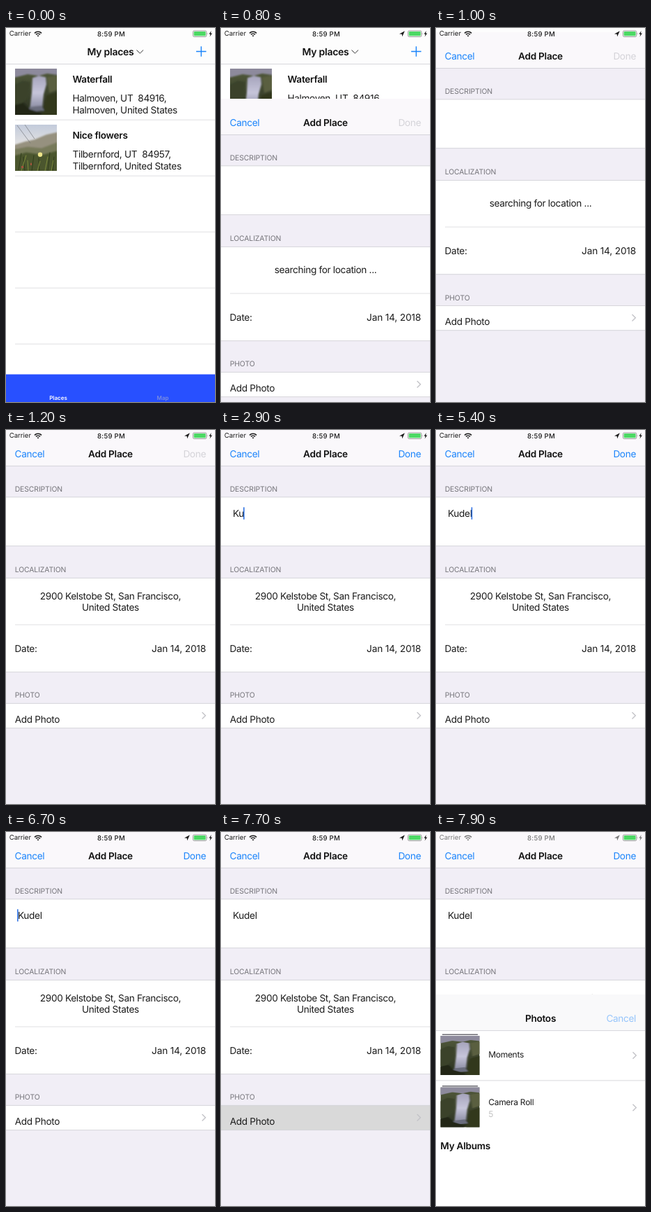
Write an HTML page that moves like this. It is 300 px wide and 534 px high and loops after 8 s.

```html
<!DOCTYPE html>
<html lang="en">
<head>
<meta charset="utf-8">
<title>My places</title>
<style>
  html, body { margin: 0; width: 100%; height: 100%; overflow: hidden; background: #fff; }
  svg { display: block; }
  text { font: 13.6px Inter, sans-serif; letter-spacing: -.33px; fill: #1c1c1c; text-rendering: geometricPrecision; }
  .mid { text-anchor: middle; }
  .end { text-anchor: end; }
  .bold { font-weight: 600; letter-spacing: -.26px; fill: #111; }
  .link { fill: #1a84fb; }
  .off { fill: #d4d3d8; }
  .head { font-size: 10.4px; letter-spacing: -.1px; fill: #75747a; }
  .row { font-size: 12px; letter-spacing: -.28px; }
  .tab { font-size: 8px; font-weight: 600; letter-spacing: 0; }
  .tiny { font-size: 9.6px; letter-spacing: 0; fill: currentColor; }
  .line { fill: none; stroke: #cfced4; stroke-width: .8; }
  .thin { stroke: #d9d9dc; }
  .chev { fill: none; stroke: #c3c3c8; stroke-width: 1.4; }
</style>
</head>
<body>
<svg width="300" height="534" viewBox="0 0 300 534">
  <defs>
    <linearGradient id="water" x1="0" y1="0" x2="0" y2="1">
      <stop offset="0" stop-color="#a5a3bb"/>
      <stop offset=".5" stop-color="#c6c5da"/>
      <stop offset="1" stop-color="#85879c"/>
    </linearGradient>
    <linearGradient id="cliff" x1="0" y1="0" x2="0" y2="1">
      <stop offset="0" stop-color="#525a3c"/>
      <stop offset="1" stop-color="#2b3120"/>
    </linearGradient>
    <linearGradient id="sky" x1="0" y1="0" x2="0" y2="1">
      <stop offset="0" stop-color="#c3cbdb"/>
      <stop offset=".5" stop-color="#e8e6e4"/>
    </linearGradient>
    <filter id="soft"><feGaussianBlur stdDeviation=".9"/></filter>
    <symbol id="falls" viewBox="0 0 60 65" preserveAspectRatio="none">
      <path fill="url(#cliff)" d="M0 0h60v65H0z"/>
      <g filter="url(#soft)">
        <path fill="#8d8a9c" d="M-3-3h66V9L46 7 34 10 18 8-3 13z"/>
        <path fill="#3a422b" d="M-3 24l14-7 11 2-3 22-10 8-12 2z"/>
        <path fill="url(#water)" d="M25 13l9-3 10 2 1 10-4 14-2 20-18 2 3-24z"/>
        <path fill="#5a5f3f" d="M46 12l17-3v20l-14 5z"/>
        <path fill="#33391f" d="M45 38l18-6v36H38z"/>
        <path fill="#6b6d7d" d="M21 54l17-2 4 7-24 2z"/>
        <path fill="#222819" d="M-3 52l15-4 9 9 16 5v6H-3z"/>
      </g>
    </symbol>
    <symbol id="meadow" viewBox="0 0 60 65" preserveAspectRatio="none">
      <path fill="url(#sky)" d="M0 0h60v65H0z"/>
      <g filter="url(#soft)">
        <path fill="#96917f" d="M-3 29l17-5 14-3 17-7 18-4v58H-3z"/>
        <path fill="#777a5a" d="M-3 35l21-4 20 2 25-9v44H-3z"/>
        <path fill="#4b562d" d="M-3 44l19-5 24 3 23-6v32H-3z"/>
      </g>
      <path fill="none" stroke="#303c1c" d="M5 64l4-24m5 25l-2-20m12 20l3-22m8 22l-1-18m13 18l3-26m4 26l2-20"/>
      <path fill="none" stroke="#7d8b3d" d="M9 65l7-22m3 22l-1-15m14 15l4-14m7 14l4-20m5 20l3-15"/>
      <path fill="none" stroke="#6a6c70" stroke-width=".6" d="M3 1l19 25M14 0l14 20"/>
      <path fill="#a4523c" d="M9 58h3v3H9zM22 54h2v3h-2z"/>
      <circle fill="#eee58a" cx="36" cy="42" r="3.2"/>
    </symbol>
  </defs>

  <g id="list">
    <path fill="#fdfdfd" d="M0 0h300v51H0z"/>
    <path class="line" d="M0 51.5h300"/>
    <path class="line thin" d="M13 131.2h287M13 211.2h287M13 291.2h287M13 371.2h287M13 451.2h287"/>
    <text class="mid bold" x="150" y="38.5" style="font-size:14px">My places</text>
    <path d="M187.5 31.5l4.8 4.6 4.8-4.6" fill="none" stroke="#333"/>
    <path id="plus" d="M273 33.5h14.4M280.2 26.3v14.4" fill="none" stroke="#1a84fb" stroke-width="1.4"/>
    <use href="#falls" x="13" y="58" width="60" height="66"/>
    <text class="bold" x="95.5" y="77.7">Waterfall</text>
    <text x="95.5" y="105.2">Halmoven, UT&#160; 84916,</text>
    <text x="95.5" y="121.6">Halmoven, United States</text>
    <use href="#meadow" x="13" y="138" width="60" height="66"/>
    <text class="bold" x="95.5" y="157.7">Nice flowers</text>
    <text x="95.5" y="185.2">Tilbernford, UT&#160; 84957,</text>
    <text x="95.5" y="201.6">Tilbernford, United States</text>
    <path fill="#2850ff" d="M0 494.6h300V534H0z"/>
    <text class="tab mid" x="75" y="531" style="fill:#fff">Places</text>
    <text class="tab mid" x="225" y="531" style="fill:#7b8de0">Map</text>
  </g>

  <g id="form">
    <path fill="#f1eef6" d="M0 0h300v534H0z"/>
    <path fill="#faf8fb" d="M0 0h300v51H0z"/>
    <path fill="#fff" d="M0 96h300v69.5H0zM0 211.5h300v134H0zM0 390.5h300v35H0z"/>
    <path id="press" fill="#d9d9d9" d="M0 390.5h300v35H0z"/>
    <path class="line" d="M0 51.4h300M0 95.8h300M0 165.6h300M0 211.4h300M0 345.6h300M0 390.4h300M0 425.6h300"/>
    <path class="line thin" d="M13 278h287"/>
    <text class="link" x="12.6" y="38.5">Cancel</text>
    <text class="mid bold" x="150" y="38.5">Add Place</text>
    <text class="end off" id="done" x="287" y="38.5">Done</text>
    <text class="head" x="12.7" y="87.8">DESCRIPTION</text>
    <text id="word" x="17" y="124">Kudel</text>
    <rect id="caret" y="110.3" width="1.6" height="17.4" fill="#2f72e4"/>
    <text class="head" x="12.7" y="202.9">LOCALIZATION</text>
    <text class="mid" id="search" x="150" y="248.6">searching for location ...</text>
    <g id="address">
      <text class="mid" x="150" y="241.6">2900 Kelstobe St, San Francisco,</text>
      <text class="mid" x="150" y="257.6">United States</text>
    </g>
    <text x="12.6" y="316.8">Date:</text>
    <text class="end" x="287" y="316.8" style="letter-spacing:-.14px">Jan 14, 2018</text>
    <text class="head" x="12.7" y="382.4">PHOTO</text>
    <text x="12.8" y="418.2">Add Photo</text>
    <path class="chev" d="M281.5 403l4.8 4.7-4.8 4.7"/>
  </g>

  <g id="albums">
    <path fill="#fff" d="M0 0h300v534H0z"/>
    <path fill="#f9f9fa" d="M0 0h300v51H0z"/>
    <path class="line" d="M0 51.5h300M0 122.8h300"/>
    <text class="mid bold" x="150" y="38.5">Photos</text>
    <text class="end" x="287" y="38.5" style="fill:#96c5fb">Cancel</text>
    <path fill="#6b6a72" d="M9 56.5h51v1.4H9zM9 130h51v1.4H9z"/>
    <use href="#falls" x="6.5" y="59" width="56" height="56"/>
    <use href="#falls" x="6.5" y="132.5" width="56" height="57"/>
    <text class="row" x="75.2" y="90">Moments</text>
    <text class="row" x="75.2" y="158">Camera Roll</text>
    <text class="row" x="75.2" y="175.2" style="fill:#c2c2c2">5</text>
    <path class="chev" d="M282.5 82.3l4.8 4.7-4.8 4.7M282.5 156.8l4.8 4.7-4.8 4.7"/>
    <text class="bold" x="6.3" y="221">My Albums</text>
  </g>

  <g id="status" fill="currentColor">
    <text class="tiny" x="4.7" y="11.4">Carrier</text>
    <path d="M41 7.3a7.2 7.2 0 0 1 10 0M43 9.4a4.3 4.3 0 0 1 6 0" fill="none" stroke="currentColor" stroke-width="1.6"/>
    <path d="M44.4 10.8q1.6-1.2 3.2 0l-1.6 1.7z"/>
    <text class="tiny mid" x="151" y="11.5" style="font-weight:500;letter-spacing:.25px">8:59 PM</text>
    <path id="arrow" d="M256 8.6l7.8-4.4-3.6 8-.6-3.5z"/>
    <rect x="268.4" y="3.9" width="19.4" height="8.6" rx="1.8" fill="none" stroke="#888" stroke-width=".8"/>
    <rect x="269.6" y="5.1" width="17" height="6.2" rx=".8" fill="#4cd964"/>
    <path d="M288.7 6.7q1.4 1.5 0 3z" fill="#888"/>
    <path d="M294.6 4l-3.2 4.8h2l-.9 3.8 3.5-5h-2.1z"/>
  </g>
</svg>
<script>
  const LOOP = 8000, STEP = 100, H = 534, RISE = 500;
  const $ = id => document.getElementById(id);
  const show = (id, on) => { $(id).style.display = on ? '' : 'none'; };

  // Value of the last [time, value] pair reached
  const at = (t, pairs) => pairs.reduce((v, [when, value]) => t >= when ? value : v, pairs[0][1]);

  const typed = [[0, 0], [2300, 1], [2900, 2], [3500, 3], [3600, 4], [4100, 5]];
  const cursor = [[0, 9], [6400, 3], [6500, 2], [6600, 1], [6700, 0]];
  const blink = [[0, 0], [1900, 1], [4700, .5], [4800, 0], [5100, .5], [5200, 1],
    [5700, .5], [5800, 0], [6100, .5], [6200, 1], [7200, .5], [7300, 0]];

  const bez = (s, a, b) => 3 * (1 - s) * (1 - s) * s * a + 3 * (1 - s) * s * s * b + s * s * s;

  function ease(x) {
    let lo = 0, hi = 1;
    for (let i = 0; i < 24; i++) {
      const s = (lo + hi) / 2;
      if (bez(s, .38, .125) < x) lo = s; else hi = s;
    }
    return bez(lo, .7, 1);
  }

  function rise(id, t, start) {
    const x = Math.min(1, (t - start) / RISE);
    show(id, x > 0);
    if (x > 0) $(id).setAttribute('transform', `translate(0 ${(H * (1 - ease(x))).toFixed(2)})`);
  }

  function draw(t) {
    rise('form', t, 627);
    rise('albums', t, 7784);
    $('plus').style.opacity = t === 500 ? .3 : 1;
    show('arrow', t >= 600);
    show('search', t < 1200);
    show('address', t >= 1200);
    show('press', t >= 7700);
    $('status').style.color = t >= 7800 ? '#7a7a7a' : '#1c1c1c';

    const n = at(t, typed), pos = Math.min(n, at(t, cursor));
    $('word').textContent = 'Kudel'.slice(0, n);
    $('done').setAttribute('class', n ? 'end link' : 'end off');
    const w = pos ? $('word').getSubStringLength(0, pos) : 0;
    $('caret').setAttribute('x', 16 + w);
    $('caret').style.opacity = at(t, blink);
  }

  let origin;
  function tick(now) {
    origin ??= now;
    draw(Math.floor((now - origin + 8) / STEP) * STEP % LOOP);
    requestAnimationFrame(tick);
  }
  draw(0);
  requestAnimationFrame(tick);
</script>
</body>
</html>
```
